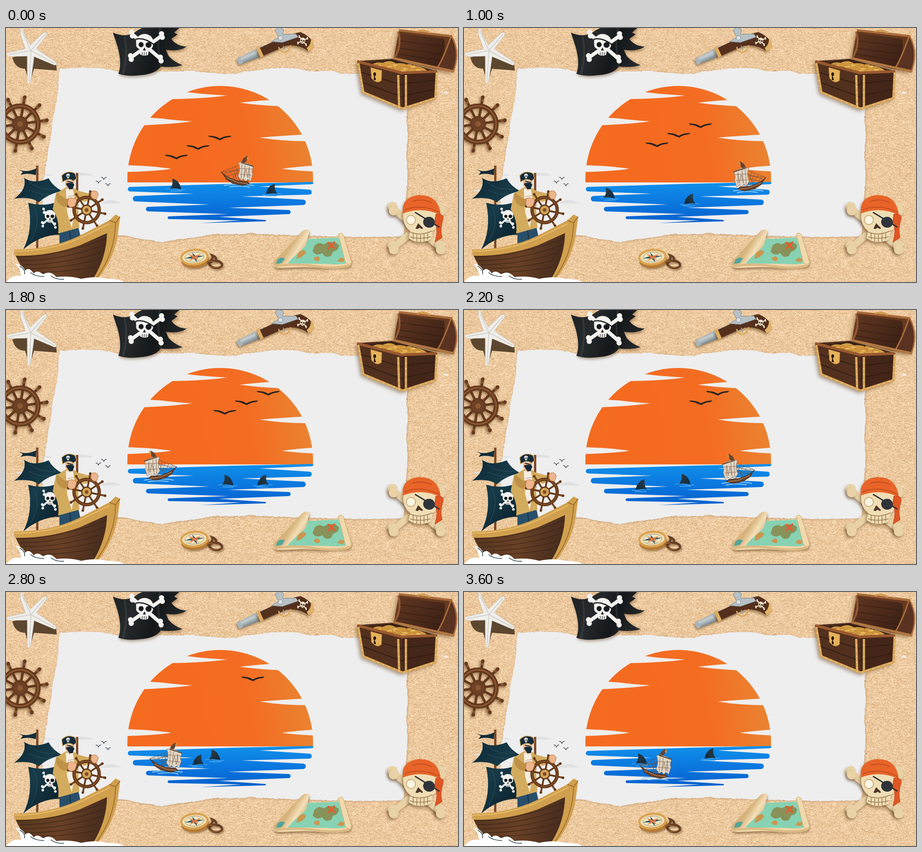
Animation, 998 px wide and 561 px high, one loop 3800 ms. Source, as an HTML page with a canvas:

```html
<!DOCTYPE html>
<html lang="en">
<head>
<meta charset="utf-8">
<title>Pirate beach</title>
<style>
html, body { margin: 0; width: 100%; height: 100%; overflow: hidden; background: #eac79b; }
canvas { display: block; }
</style>
</head>
<body>
<canvas id="stage" width="998" height="561"></canvas>
<script>
const W = 998, H = 561, LOOP = 3800, STEP = 200;
const screen2d = document.getElementById('stage').getContext('2d');
const scene = document.createElement('canvas');
scene.width = W;
scene.height = H;
let g = scene.getContext('2d');

let seed = 71;
function rnd() {
  seed = (seed * 1664525 + 1013904223) >>> 0;
  return seed / 4294967296;
}

// Fill and/or stroke an SVG path
function p(d, fill, line, w = 1) {
  const path = new Path2D(d);
  if (fill) { g.fillStyle = fill; g.fill(path); }
  if (line) { g.strokeStyle = line; g.lineWidth = w; g.stroke(path); }
}
function oval(x, y, rx, ry, fill, line, w = 1, turn = 0) {
  g.beginPath();
  g.ellipse(x, y, rx, ry, turn, 0, 7);
  if (fill) { g.fillStyle = fill; g.fill(); }
  if (line) { g.strokeStyle = line; g.lineWidth = w; g.stroke(); }
}
function at(x, y, sx, sy, draw, turn = 0) {
  g.save();
  g.translate(x, y);
  g.rotate(turn);
  g.scale(sx, sy);
  draw();
  g.restore();
}
function ramp(x0, y0, x1, y1, ...colors) {
  const r = g.createLinearGradient(x0, y0, x1, y1);
  colors.forEach((c, i) => r.addColorStop(i / (colors.length - 1), c));
  return r;
}
function shaded(blur, dx, dy, draw, color = 'rgba(90,55,20,.5)') {
  g.save();
  g.shadowColor = color;
  g.shadowBlur = blur;
  g.shadowOffsetX = dx;
  g.shadowOffsetY = dy;
  draw();
  g.restore();
}

function sand() {
  const img = g.createImageData(W, H), a = img.data;
  let prev = 0;
  for (let i = 0; i < a.length; i += 4) {
    prev = prev * .45 + (rnd() + rnd() - 1) * 32;
    const v = prev - (rnd() < .035 ? 32 : 0);
    a[i] = 237 + v * .75;
    a[i + 1] = 202 + v;
    a[i + 2] = 160 + v * 1.25;
    a[i + 3] = 255;
  }
  g.putImageData(img, 0, 0);
  oval(971, 143, 5, 3, '#f3e9dd');
  p('M878 195l9 3', null, '#cf8048', 1.5);
}

function torn(pts, fill) {
  g.beginPath();
  pts.forEach(([x, y], i) => {
    const [u, v] = pts[(i + 1) % pts.length];
    const n = Math.ceil(Math.hypot(u - x, v - y) / 4);
    for (let k = 0; k < n; k++)
      g.lineTo(x + (u - x) * k / n + rnd() * 2 - 1, y + (v - y) * k / n + rnd() * 2 - 1);
  });
  g.closePath();
  g.fillStyle = fill;
  g.fill();
}

function paper() {
  shaded(4, 1, 1, () => torn([
    [118, 90], [172, 87], [207, 88], [250, 96], [385, 96], [405, 94], [440, 98], [472, 101], [510, 101],
    [527, 96], [560, 93], [590, 88], [640, 89], [672, 96], [720, 94], [740, 101], [790, 101], [888, 165],
    [884, 200], [887, 240], [884, 280], [887, 330], [884, 365], [878, 460], [780, 462], [650, 458],
    [560, 455], [540, 453], [510, 456], [462, 455], [420, 462], [380, 467], [345, 473], [300, 466],
    [250, 457], [82, 455], [80, 345], [86, 320], [92, 275], [99, 240], [103, 200], [111, 165], [115, 130]
  ], '#eee'), 'rgba(150,110,70,.45)');
}

function sun() {
  g.save();
  g.beginPath();
  g.rect(260, 120, 430, 221);
  g.clip();
  oval(473, 333, 205, 205, ramp(268, 330, 678, 250, '#f56b20', '#f46b20', '#f46c22', '#e98532'));
  for (const d of [
    'M390 140Q425 146 488 149Q440 156 360 157Z',
    'M610 157Q560 160 516 165Q560 171 610 173Z',
    'M300 197L345 200Q375 204 411 206Q375 212 296 215Z',
    'M665 235Q610 238 560 242Q610 250 665 250Z',
    'M260 303Q320 304 365 311Q325 317 260 318Z',
    'M690 303Q645 306 609 311Q645 316 690 317Z'
  ]) p(d, '#eee');
  g.restore();
}

function sea() {
  p('M500 344L676 340Q682 342 676 345L560 350L670 357a5 5.5 0 0 1 0 11L520 372L656 379' +
    'a6 6 0 0 1 0 12L490 397L624 402a4.5 4.5 0 0 1 0 9L470 417L573 424q2 2 0 3L430 431L520 425' +
    'L360 422a3 3 0 0 1 0-6L490 411L314 405a5 5 0 0 1 0-10L450 390L286 383a6 6 0 0 1 0-12' +
    'L415 366L274 361a5 5 0 0 1 0-10Z', ramp(0, 340, 0, 430, '#1090ea', '#0b78df', '#0660cd'));
}

// Skull about 40 units wide
function skull(bone = '#f4f2ee', dark = '#171a1c') {
  p('M-17-2C-21-27 21-27 17-2Q18 7 9 9L8 19Q0 23-8 19L-9 9Q-18 7-17-2Z', bone);
  oval(-7, 0, 5, 5, dark);
  oval(8, 0, 6, 5.5, dark);
  p('M0 5l-3 6h6Z', dark);
  p('M-4 14v6M0 14v7M4 14v6', null, dark, 1);
}
function bones(color, r = 38, rise = 24, w = 7) {
  for (const s of [-1, 1]) {
    p(`M${-r} ${-rise * s}L${r} ${rise * s}`, null, color, w);
    for (const e of [-1, 1]) {
      oval(e * r - 1, e * s * rise - 4, w * .72, w * .72, color);
      oval(e * r + 1, e * s * rise + 4, w * .72, w * .72, color);
    }
  }
}

function starfish() {
  p('M14 65L55 55L111 80L112 94L62 90L52 122L42 90Q20 90 14 65Z', 'rgba(62,42,22,.82)');
  p('M32 0Q38 0 42 17L54 38L82 11Q91 7 90 15L67 46L108 74Q115 82 107 82L62 63L56 108Q53 128 47 121' +
    'L47 62L8 63Q-2 60 3 55L43 46L32 15Z', '#efeeeb', '#c9c4bb', 1);
  p('M35 6L55 50L86 14M55 50L107 78M55 50L51 118M55 50L6 59', null, '#d5d1ca', 2);
}

function flag() {
  shaded(6, 2, 3, () => p('M236 10Q262 22 284 10Q296 0 312-3H386L371 10L379 14L365 24Q376 40 399 41Q382 53 353 48' +
    'L359 62Q372 76 390 82Q370 88 342 85Q329 102 298 104Q268 108 248 101Q257 78 246 40Z',
    ramp(236, 0, 390, 60, '#1d2123', '#262a2c', '#14181a', '#25292b')));
  p('M262 18Q270 60 258 102M340 0Q332 35 342 84', null, 'rgba(80,88,88,.35)', 4);
  at(310, 41, 1, 1, () => bones('#f4f2ee', 33, 26, 8), .05);
  at(306, 37, 1.1, 1.15, skull, .04);
  p('M286 25Q305 20 327 37', null, '#171a1c', 2.5);
}

function pistol() {
  shaded(5, -3, 4, () => {
    p('M510 68L560 42L604 28L607 42L562 63L516 81Z', ramp(530, 50, 540, 72, '#8d979d', '#c4ced1', '#78858b'));
    p('M554 47L590 30Q625 14 650 9Q680 22 679 42L669 52Q648 36 620 39Q590 51 562 64Z', '#54301d');
  });
  p('M552 43l7-3l10 22l-7 4Z', '#dfae61');
  p('M509 68l7-4l7 13l-8 5Z', '#aab5b9');
  p('M664 44Q675 36 673 20Q682 33 680 44L668 52Z', '#e0b269');
  p('M586 30L602 20L594 5L602-2L613 3L611 14L640 13L645 20L610 32Z', '#b7c0c4', '#77838a', 1);
  p('M602 42Q607 60 623 50L629 38', null, '#d9a759', 3);
  p('M612 39l3 10', null, '#94a0a5', 2);
  oval(606, 22, 5, 5, '#dce2e3', '#7d878c');
  at(655, 28, .33, .33, () => { bones('#eee3cc', 28, 22, 7); skull('#eee3cc', '#4a2a1a'); }, .2);
}

function chest() {
  shaded(9, -4, 4, () => {
    p('M868 4L984 17Q1004 52 987 97L944 90L856 68Z', '#66391f');
    p('M775 73L852 68L952 95L949 156L876 180L787 143Z', '#4d2c1c');
  });
  p('M871 12L967 24Q975 50 951 86L860 65Q874 40 871 12Z', ramp(870, 20, 950, 90, '#5c3420', '#3c2115'));
  p('M869 28L968 41M867 44L964 58M863 57L957 72', null, '#2f1a11', 1.2);
  p('M868 5L984 18', null, '#a86a39', 5);
  p('M866 8Q875 40 857 67', null, '#965a30', 4);
  p('M982 20Q968 62 952 89L987 97Q1004 55 984 18Z', '#5a3221', '#aa6d3b', 3);
  p('M857 67L990 96', null, '#b27742', 5);
  p('M907 8q14-6 29 3', null, '#d39c4e', 4);
  p('M791 78L852 70L938 95L873 99Z', '#352014');
  p('M805 84Q814 73 832 77Q847 69 861 78Q880 76 888 84Q914 80 931 95L873 103Z', '#d29b43');
  for (let i = 0; i < 26; i++)
    oval(818 + rnd() * 96, 82 + rnd() * 14, 7, 3, i % 2 ? '#e9b75a' : '#d79a3d', '#aa722a', .8);
  p('M777 75L874 99L876 178L788 142Z', '#51301e');
  p('M875 99L951 96L948 155L876 178Z', '#432619');
  p('M781 97L875 126M784 119L876 153M875 123L950 115M876 150L949 135', null, '#2c1911', 1.5);
  p('M776 74L874 99L951 96', null, '#99592f', 6);
  p('M778 78L789 142L876 178L948 155L951 98M866 104L868 173M883 104L883 174', null, '#d9a65a', 5);
  g.setLineDash([1.5, 11]);
  p('M778 78L789 142L876 178L948 155L951 98M866 104L868 173M883 104L883 174', null, '#fbe0a0', 2.5);
  g.setLineDash([]);
  p('M805 87L830 94L829 116Q819 125 807 111Z', '#e6b25a', '#a87436', 1);
  oval(814, 102, 3, 4, '#24150e');
  p('M813 102l-1 13h5Z', '#24150e');
}

function helm(x, y, r, count, start, rim, light, hub) {
  for (let i = 0; i < count; i++) at(x, y, 1, 1, () => {
    p(`M0 0H${r * 1.32}`, null, rim, r * .12);
    p(`M${r * 1.1} 0H${r * 1.32}`, null, light, r * .13);
    oval(r * 1.3, 0, r * .09, r * .09, rim);
  }, start + i * 2 * Math.PI / count);
  oval(x, y, r * .87, r * .87, null, rim, r * .23);
  oval(x, y, r * .87, r * .87, null, light, r * .07);
  oval(x, y, r * .34, r * .34, hub, rim, r * .08);
  oval(x, y, r * .13, r * .13, light);
}

function compass() {
  shaded(4, 2, 3, () => {
    oval(418, 514, 31, 16, '#b77b36', null, 1, -.08);
    oval(463, 522, 14, 8, null, '#684025', 5, .1);
    p('M444 519Q460 510 455 502Q467 506 463 516', null, '#684025', 5);
  });
  oval(416, 506, 29, 16, '#f3e4bc', '#dba452', 5, -.08);
  oval(416, 506, 21, 11, null, '#8e8b74', 1, -.08);
  p('M395 509L413 503L411 496L418 503L438 503L420 508L422 517L414 509Z', '#305c68');
  p('M403 499L416 504L430 499L420 508L427 514L416 509L404 515L412 507Z', '#e07642');
  p('M443 519q8-8 18-1M449 526q12 7 26-1', null, '#a46d3c', 1.5);
}

function map() {
  shaded(5, 1, 4, () => {
    p('M653 450Q661 443 670 447L666 466L734 462Q730 452 740 453L763 516Q762 530 745 527L701 530L660 528L610 530Q588 531 590 519Z', '#efd6a9');
  });
  p('M667 466L734 463L756 518Q740 524 710 521L622 520Z', '#87d2b3');
  p('M681 481Q691 471 701 478Q720 467 735 479Q736 491 722 494L718 503Q704 510 699 497Q684 505 677 493Z', '#88925a');
  p('M645 496Q658 486 663 495Q656 507 641 510ZM688 504Q696 509 690 515Q680 515 679 508ZM738 507l10 3-4 7-13-2Z', '#c99650');
  p('M602 515Q611 499 621 508L614 520Z', '#65ad9a');
  p('M653 450Q661 443 670 447L662 481L622 518Q606 521 597 526Q588 524 590 517Z', ramp(630, 480, 658, 498, '#d7b37c', '#f4dfb8', '#d7b580'));
  p('M734 456Q740 449 745 457L763 517Q758 528 749 517Z', '#f0d9ad', '#cda66e', 1);
  p('M599 512q8-8 17-3l-7 10-13 2Z', '#54a49a');
  p('M594 526Q640 519 680 526T758 525', null, '#dcb983', 5);
  p('M710 473L726 487M726 472L711 488', null, '#e45d30', 4);
}

function bandit() {
  shaded(6, -3, 4, () => {
    at(907, 442, 1, 1, () => bones('#e9d2a6', 52, 43, 15));
    p('M878 402Q876 371 914 369Q956 371 958 410Q958 438 943 448L938 467Q911 480 889 464L892 448Q873 434 878 402Z', '#efddb4');
  });
  p('M876 410Q872 374 910 369Q955 367 960 413Q917 393 876 410Z', '#e86428');
  p('M949 411Q970 409 964 426Q958 447 963 463L947 473Q956 444 946 431Z', '#df5622', '#b84120', 1);
  p('M880 402Q914 387 957 407M897 383Q920 375 940 386', null, '#b94520', 1.5);
  oval(894, 424, 10, 10, '#fbf5e3', '#c59f6c', 1.5);
  oval(934, 429, 13, 12, '#30343a', null, 1, .25);
  p('M903 407L957 440', null, '#30343a', 3);
  p('M910 431l-6 12 5 1 4-3 5 3 3-2Z', '#4b3427');
  p('M889 449Q912 461 942 448M892 461Q912 468 938 461M899 453v14M907 456v16M915 456v17M923 455v16M931 453v14', null, '#9d7950', 1.5);
}

function gull(w, h, thick) {
  p(`M${-w}-${h * .35}Q${-w * .45}-${h * .65} 0 ${h * .5}Q${w * .4}-${h * .5} ${w}-${h * .4}`, null, '#293440', thick);
}

function galleon() {
  p('M82 326Q92 319 104 326ZM145 325Q160 315 190 323L190 326H145ZM207 388Q222 379 236 380L256 387ZM18 361Q35 353 63 361Z', '#dfe0e2');
  [[204, 340], [216, 332], [225, 346]].forEach(([x, y]) => at(x, y, 1, 1, () => gull(6, 5, 1.2)));
  p('M69 304V500M157 320V394', null, '#794525', 5);
  const navy = ramp(20, 350, 125, 440, '#102b38', '#173b49', '#0d2531');
  p('M27 312Q44 321 67 310L66 325Q45 319 32 325L37 318Z', navy);
  p('M40 331Q61 346 94 332Q104 350 124 360Q91 367 73 385Q55 372 18 377Q47 356 40 331Z', navy);
  p('M49 386Q81 395 111 385Q119 420 127 457Q81 453 38 489Q61 445 49 386Z', navy);
  p('M50 340Q75 360 111 356M52 357Q75 370 99 367M60 392Q80 426 55 470', null, '#315361', 1);
  at(96, 420, 1, 1, () => bones('#f5f3ef', 14, 15, 4), .1);
  at(97, 416, .67, .68, skull);

  // Captain
  p('M118 431H158L166 468L118 477Z', '#294f6a');
  p('M139 433l4 36', null, '#173247', 2);
  p('M130 353Q145 347 158 359L181 365L193 359L201 373L174 384L158 379L162 441L115 454Q119 425 103 400L110 366Z', '#d3ab5e');
  p('M132 355L148 356L154 395L145 442L135 407Z', '#f5ede0');
  p('M136 372l15-2M137 380l15-1', null, '#9c8b7b', 1);
  p('M112 363Q106 385 128 395L155 385L152 376L130 377', '#bd9147');
  p('M131 337H150L151 349L141 359L131 348Z', '#e7ae86');
  p('M132 344Q142 339 151 345L147 356L140 356Z', '#132a36');
  p('M123 326Q135 313 152 321L156 332L149 338Q139 330 125 340Z', '#132d3c', '#d5a252', 1.5);
  at(137, 327, .24, .25, skull);
  p('M135 338l13 4', null, '#132d3c', 2);

  helm(178, 402, 32, 8, .2, '#633819', '#83502a', '#d2a557');
  p('M138 376Q150 372 156 381L152 393Q139 401 136 388ZM188 362Q200 355 204 367L200 378Q190 379 188 371Z', '#edb58b', '#b9754d', 1);

  // Hull and bow
  p('M18 493Q100 493 165 466L229 442L234 470Q224 523 194 555H65Q32 537 18 493Z', ramp(20, 490, 220, 540, '#55351f', '#694126', '#42291c'));
  for (let i = 0; i < 5; i++)
    p(`M${24 + i * 7} ${505 + i * 9}Q${110 + i * 6} ${507 + i * 8} ${223 - i * 7} ${464 + i * 16}`, null, '#362219', 1.2);
  p('M17 489Q96 490 160 460L228 425L242 412L252 417L247 455Q240 506 204 553H193Q222 506 223 453L163 480Q92 505 20 503Z', '#d1a04e');
  p('M228 425L242 430L252 417M242 430Q240 500 199 553', null, '#946229', 1.5);
  p('M17 493Q96 493 161 465L229 432', null, '#e8bd6d', 2);
  p('M20 520Q39 524 42 536Q51 526 61 542Q69 533 82 544Q98 534 111 550Q142 547 166 554Q197 547 224 554Q246 553 262 561H0Q17 542 34 548Q31 529 20 520Z', '#fff');
  p('M30 526Q43 532 41 544M54 540Q64 549 84 549M99 547Q109 556 128 555', null, '#253e49', 1.5);
}

function buildScene() {
  sand();
  paper();
  sun();
  sea();
  starfish();
  flag();
  pistol();
  chest();
  shaded(6, -2, 3, () => helm(31, 212, 46, 10, -.14, '#663a20', '#8d5831', '#70442a'));
  compass();
  map();
  bandit();
  galleon();
}

// Drawn facing left; the origin is the masthead
function boat() {
  p('M-48 60Q-18 54 19 60M-36 63Q-8 59 10 64', null, '#8fc9f2', 2);
  p('M-54 30L-38 42L-20 49L4 51L9 56L-7 60L-29 55L-43 46L-49 36Z', '#67412b', '#382820', 1);
  p('M-43 42L-18 53L5 56', null, '#b48254', 1.5);
  p('M-1 0L-15 56M-54 30L-9 13L-31 51M-54 30L14 24M-45 27L-31 51M-37 23L-21 51M-29 20L-19 48M-22 17L-15 46M-41 39L-12 32M-47 34L-14 23', null, '#68503f', .8);
  p('M-16 9Q1 6 17 18L14 30L16 35L11 51L5 46L0 51L-5 45L-10 49L-17 39Q-10 25-16 9Z', '#e0d5c5', '#7a6554', .8);
  p('M-8 12L-10 46M-1 14L-4 43L1 24L5 43L8 20L9 45M-13 22L16 24M-13 35L13 37', null, '#8e6e55', 1);
  p('M-10 9L18 18', null, '#60452f', 2);
  p('M-5 0L4-6L2 6L-2 10L-9 7Z', '#66452e');
  p('M2 0L7-6L6 5Z', '#d88e47');
}

function fin() {
  p('M-22 10Q-12 7-2 10T20 11M-12 14H13', null, '#55b0ee', 1.3);
  p('M-13 9Q-5 0-8-13Q8-10 12 10Q0 7-13 9Z', ramp(-10, -10, 12, 10, '#293b45', '#132a3a'));
}

// Keys: time, x, y, side
const shipRoute = [
  [0, 529, 288, 1], [400, 330, 291, 1], [600, 312, 293, -1], [1000, 613, 300, -1], [1200, 620, 304, 1],
  [1600, 350, 312, 1], [1800, 323, 316, -1], [2200, 588, 323, -1], [2400, 630, 328, 1], [2800, 371, 338, 1],
  [3000, 320, 341, -1], [3200, 475, 345, -1], [3400, 560, 349, 1], [3600, 441, 352, 1]
];
const finRoutes = [
  [[0, 375, 346, 1], [600, 480, 357, 1], [800, 530, 369, -1], [1000, 498, 379, -1], [1400, 390, 380, 1],
    [1600, 500, 378, 1], [1800, 567, 377, -1], [2000, 500, 376, -1], [2200, 488, 375, 1], [2400, 515, 374, -1],
    [2800, 424, 372, -1], [3200, 480, 365, 1], [3600, 543, 358, -1]],
  [[0, 586, 357, -1], [600, 412, 370, -1], [800, 345, 368, -1], [1000, 321, 366, 1], [1800, 490, 377, 1],
    [2000, 470, 382, -1], [2200, 391, 387, -1], [2400, 370, 377, 1], [2800, 461, 361, 1],
    [3000, 500, 362, -1], [3400, 420, 368, -1], [3600, 392, 370, 1]]
];
const gullRoute = [
  [0, 376, 285], [600, 404, 265], [1000, 426, 258], [1800, 483, 226], [2200, 523, 205], [2800, 545, 192]
];
const gulls = [{ until: 2800, gap: 0 }, { until: 2200, gap: 1 }, { until: 1800, gap: 2 }];

function place(route, t) {
  const i = route.findLastIndex(k => k[0] <= t);
  const a = route[i], b = route[i + 1] || a;
  const f = a === b ? 0 : (t - a[0]) / (b[0] - a[0]);
  return [a[1] + (b[1] - a[1]) * f, a[2] + (b[2] - a[2]) * f, a[3]];
}

function draw(t) {
  g.drawImage(scene, 0, 0);
  const [bx, by] = place(gullRoute, t);
  const spread = t > 1800 ? 48 - (t - 1800) * 11 / 400 : 48;
  for (const { until, gap } of gulls)
    if (t <= until) at(bx + spread * gap, by - 21 * gap, 1, 1, () => {
      p('M-26-5Q-10-6 0 1Q12-6 26-5L22-2Q9-1 1 5L-7 2Q-14-2-22-2Z', '#252322');
    });
  for (const route of finRoutes) {
    const [x, y, side] = place(route, t);
    at(x, y, side, 1, fin);
  }
  const [x, y, side] = place(shipRoute, t);
  at(x, y, side, 1, boat);
}

buildScene();
g = screen2d;
function tick() {
  draw(Math.floor(performance.now() % LOOP / STEP) * STEP);
  requestAnimationFrame(tick);
}
tick();
</script>
</body>
</html>
```
